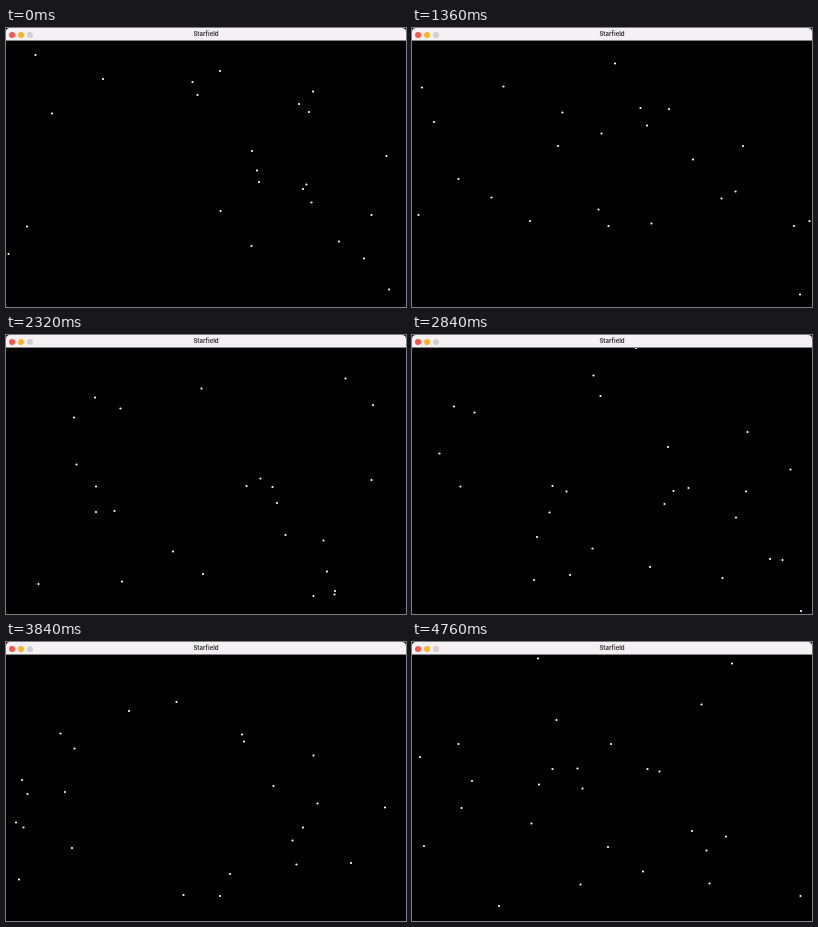
These frames come from a looping animation (400x279 px, 4800 ms). An HTML page with a canvas:

```html
<!DOCTYPE html>
<html lang="en">
<head>
<meta charset="utf-8">
<title>Starfield</title>
<style>
  html, body { margin: 0; width: 100%; height: 100%; overflow: hidden; background: #000; }
  canvas { position: absolute; left: 0; top: 0; display: block; }
  .bar {
    position: absolute; left: 0; top: 0; width: 400px; height: 12px;
    background: #f4f0f3; border-bottom: 1px solid #858385; border-radius: 4px 4px 0 0;
    font: 700 6px/12.6px Inter, "Open Sans", sans-serif;
    color: #3c393c; text-align: center;
  }
  .bar i {
    position: absolute; top: 3.5px; width: 6px; height: 6px; border-radius: 50%;
  }
  .close { left: 2.5px; background: #fe5149; }
  .hide { left: 11.5px; background: #fdb323; }
  .zoom { left: 20.5px; background: #d2ced1; }
</style>
</head>
<body>
<canvas id="sky" width="400" height="279"></canvas>
<div class="bar"><i class="close"></i><i class="hide"></i><i class="zoom"></i>Starfield</div>
<script>
const W = 400, H = 279, TOP = 13, CX = W / 2, CY = (TOP + H) / 2;
const LOOP = 4800, STEP = 40, LEAD = 1400;
const BIRTHS = 236, GROWTH = 1.1, RADIUS = 1.1;
const ctx = document.getElementById('sky').getContext('2d');

let seed = 41;
function rand(min, max) {
  seed = (seed * 16807) % 2147483647;
  return min + (max - min) * seed / 2147483647;
}

// Stars are born at a steady rate, some before the loop begins.
const stars = Array.from({ length: BIRTHS }, (_, i) => {
  const angle = rand(0, Math.PI * 2), r = rand(22, 205), speed = rand(2, 4.2);
  const c = Math.cos(angle), s = Math.sin(angle);
  return {
    born: Math.ceil((i / BIRTHS * (LOOP + LEAD) - LEAD) / STEP),
    x: CX + c * r, y: CY + s * r, vx: c * speed, vy: s * speed
  };
});

// Speed grows each step; movement is in whole units of half a pixel.
function place(star, age) {
  let { x, y, vx, vy } = star;
  for (let n = 0; n < age; n++) {
    x += Math.trunc(vx) / 2;
    y += Math.trunc(vy) / 2;
    vx *= GROWTH;
    vy *= GROWTH;
  }
  return [Math.round(x * 2) / 2, Math.round(y * 2) / 2];
}

function draw(step) {
  ctx.fillStyle = '#000';
  ctx.fillRect(0, 0, W, H);
  ctx.fillStyle = '#fff';
  for (const star of stars) {
    const age = step - star.born;
    if (age < 0) continue;
    const [x, y] = place(star, age);
    ctx.beginPath();
    ctx.arc(x, y, RADIUS, 0, Math.PI * 2);
    ctx.fill();
  }
}

const start = performance.now();
function tick() {
  draw(Math.floor((performance.now() - start) % LOOP / STEP));
  requestAnimationFrame(tick);
}
tick();
</script>
</body>
</html>
```
